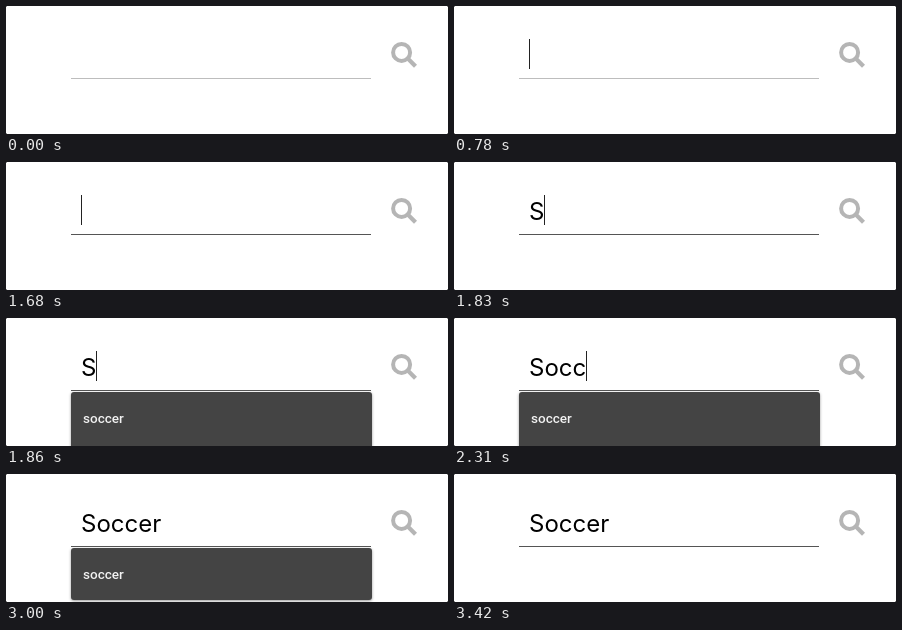
Animation, 442 px wide and 128 px high, one loop 3.45 s. Source, as an HTML page with a canvas:

```html
<!DOCTYPE html>
<html lang="en">
<head>
<meta charset="utf-8">
<title>Search field</title>
<style>
  html, body { margin: 0; width: 100%; height: 100%; overflow: hidden; background: #fff; }
  canvas { display: block; }
</style>
</head>
<body>
<canvas id="stage" width="442" height="128"></canvas>
<script>
const ctx = document.getElementById("stage").getContext("2d");
const LOOP = 3450;
const FOCUS = 1140, OPEN = 1860, SHRINK = 2490, CLOSE = 3420;
const WORD = "Soccer";
const KEYS = [1830, 2070, 2190, 2310, 2490, 2550];
const CARET_ON = [[780, 1230], [1680, 3000]];

function drawText(text, x, y, font, color) {
  ctx.font = font;
  ctx.fillStyle = color;
  ctx.fillText(text, x, y);
}

function drawCorners() {
  ctx.fillStyle = "#8a8a8a";
  for (const x of [0, 441]) for (const y of [0, 127]) ctx.fillRect(x, y, 1, 1);
}

function drawMagnifier() {
  ctx.strokeStyle = "#b5b5b5";
  ctx.lineWidth = 4;
  ctx.beginPath();
  ctx.arc(395.6, 46.4, 8.5, 0, Math.PI * 2);
  ctx.stroke();
  ctx.lineWidth = 4.2;
  ctx.beginPath();
  ctx.moveTo(401.8, 52.6);
  ctx.lineTo(409.5, 60.3);
  ctx.stroke();
}

function drawMenu(bottom) {
  ctx.save();
  ctx.shadowColor = "rgba(0,0,0,.4)";
  ctx.shadowBlur = 3;
  ctx.shadowOffsetY = 1;
  ctx.fillStyle = "#444";
  ctx.beginPath();
  ctx.roundRect(65, 74, 301, bottom - 74, 3);
  ctx.fill();
  ctx.restore();
  drawText("soccer", 77, 105, "500 13.5px Roboto, sans-serif", "#f2f2f2");
}

function draw(t) {
  ctx.fillStyle = "#fff";
  ctx.fillRect(0, 0, 442, 128);
  drawCorners();
  drawMagnifier();

  ctx.fillStyle = t < FOCUS ? "#bdbdbd" : "#555";
  ctx.fillRect(65, 72, 300, 1);
  if (t >= OPEN && t < CLOSE) drawMenu(t < SHRINK ? 140 : 126);

  const typed = WORD.slice(0, KEYS.filter(k => t >= k).length);
  drawText(typed, 75, 58, "24px Inter, sans-serif", "#000");
  if (CARET_ON.some(([on, off]) => t >= on && t < off)) {
    const x = 75 + Math.round(ctx.measureText(typed).width);
    ctx.fillStyle = "#222";
    ctx.fillRect(x, 33, 1, 30);
  }
}

function tick(now) {
  draw(now % LOOP);
  requestAnimationFrame(tick);
}
draw(0);
requestAnimationFrame(tick);
</script>
</body>
</html>
```
